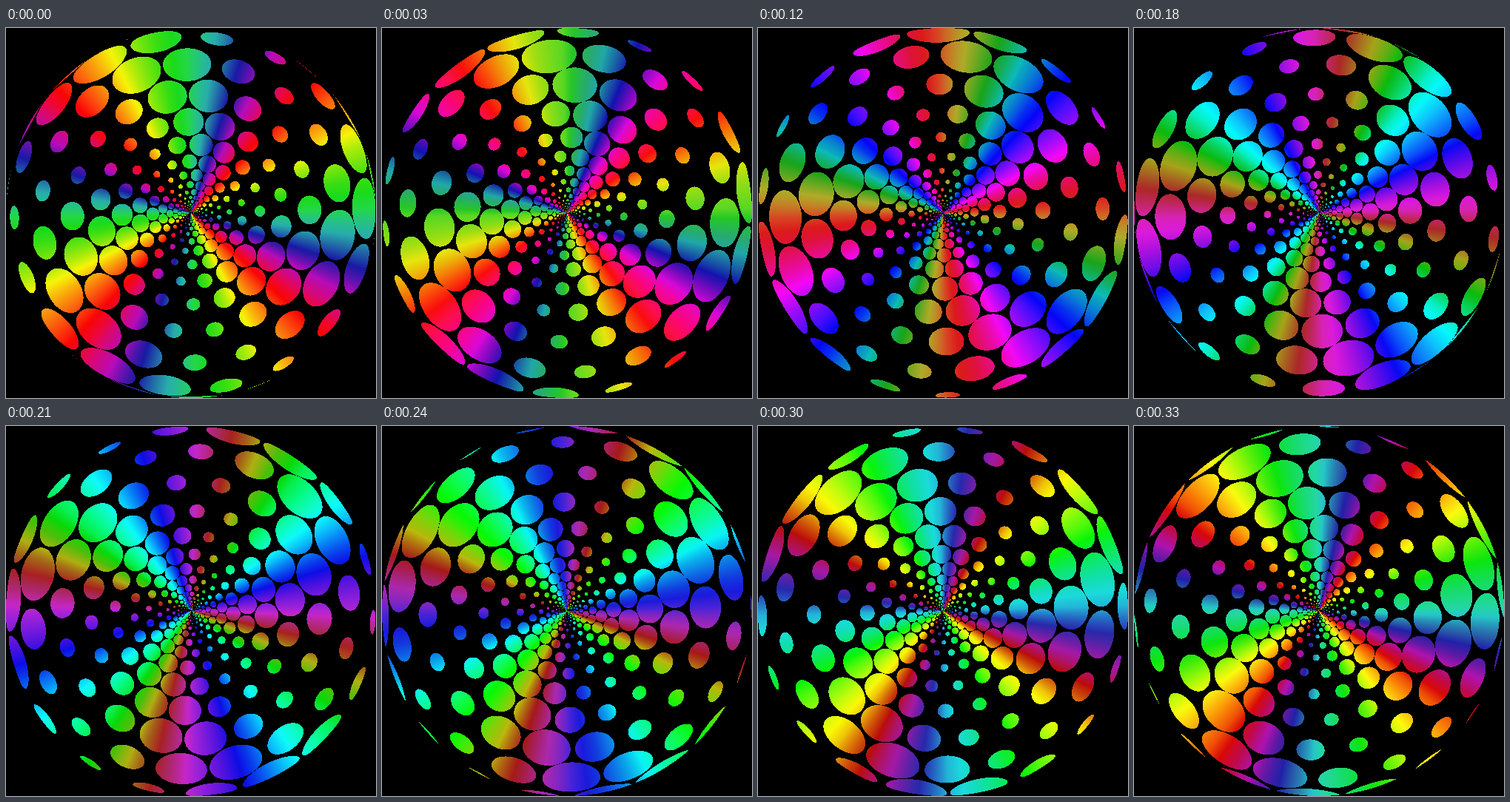
Animation, 500 px wide and 500 px high, one loop 360 ms. Source, as an HTML page with a canvas:

```html
<!DOCTYPE html>
<html lang="en">
<head>
<meta charset="utf-8">
<title>Rainbow dot sphere</title>
<style>
  html, body { margin: 0; height: 100%; overflow: hidden; background: #000; }
  canvas { display: block; width: 500px; height: 500px; }
</style>
</head>
<body>
<canvas id="stage" width="500" height="500"></canvas>
<script>
const SIZE = 500, R = SIZE / 2;
const STEPS = 12, STEP_MS = 30;
const RAD = Math.PI / 180;

// Hexagonal lattice in log-polar space: 18 dots per ring, alternate rings offset.
const SPACING = 20;
const ROW = SPACING * RAD * Math.sqrt(3) / 2;
const RING0 = 40.06 * RAD;
const ANGLE0 = 8.5;

// Base rainbow, one stop per 10 degrees, repeated four times around the disc.
const HUE = [183, 243, 307, 349, 374, 403, 437, 468, 492, 543];
const SAT = [0.62, 0.74, 0.9, 0.95, 0.97, 0.95, 0.92, 0.85, 0.72, 0.62];
const LIGHT = [0.41, 0.37, 0.39, 0.48, 0.52, 0.51, 0.48, 0.47, 0.49, 0.41];

const mod = (a, b) => ((a % b) + b) % b;

function sample(stops, x) {
  const i = Math.floor(x);
  return stops[i] + (stops[i + 1] - stops[i]) * (x - i);
}

function hslToRgb(h, s, l) {
  const a = s * Math.min(l, 1 - l);
  return [0, 8, 4].map(offset => {
    const k = mod(offset + h / 30, 12);
    return 255 * (l - a * Math.max(-1, Math.min(k - 3, 9 - k, 1)));
  });
}

function colorAt(angle, step) {
  const x = mod(angle - ANGLE0, 90) / 10;
  return hslToRgb(sample(HUE, x) - 30 * step, sample(SAT, x), sample(LIGHT, x));
}

// Dot radius relative to its ring: three swirling arms that turn clockwise.
function dotSize(angle, ring, step) {
  const peak = 34.5 - 0.9 * ring / RAD + 10 * step;
  return 0.12 + 0.053 * Math.cos(3 * (angle - peak) * RAD);
}

function insideDot(phi, angle, step) {
  const first = Math.floor(Math.log(phi / RING0) / ROW - step / 3);
  for (let row = first; row <= first + 1; row++) {
    const ring = RING0 * Math.exp(ROW * (row + step / 3));
    const start = ANGLE0 + 10 * row - 5 * step;
    const center = start + SPACING * Math.round((angle - start) / SPACING);
    const distSq = phi * phi + ring * ring
      - 2 * phi * ring * Math.cos((angle - center) * RAD);
    if (distSq < (dotSize(center, ring, step) * ring) ** 2) return true;
  }
  return false;
}

function renderStep(step) {
  const image = new ImageData(SIZE, SIZE);
  for (let y = 0, i = 0; y < SIZE; y++) {
    for (let x = 0; x < SIZE; x++, i += 4) {
      image.data[i + 3] = 255;
      const dx = x + 0.5 - R, dy = y + 0.5 - R;
      const r = Math.hypot(dx, dy);
      if (r >= R) continue;
      const phi = Math.asin(r / R);
      const angle = Math.atan2(dx, -dy) / RAD;
      if (insideDot(phi, angle, step)) image.data.set(colorAt(angle, step), i);
    }
  }
  return image;
}

const ctx = document.getElementById("stage").getContext("2d");
const steps = Array.from({ length: STEPS }, (_, n) => renderStep(n));
let start = null, shown = -1;

function draw(now) {
  if (start === null) start = now;
  const step = Math.floor(Math.max(0, now - start) / STEP_MS) % STEPS;
  if (step !== shown) {
    ctx.putImageData(steps[step], 0, 0);
    shown = step;
  }
  requestAnimationFrame(draw);
}

ctx.putImageData(steps[0], 0, 0);
requestAnimationFrame(draw);
</script>
</body>
</html>
```
